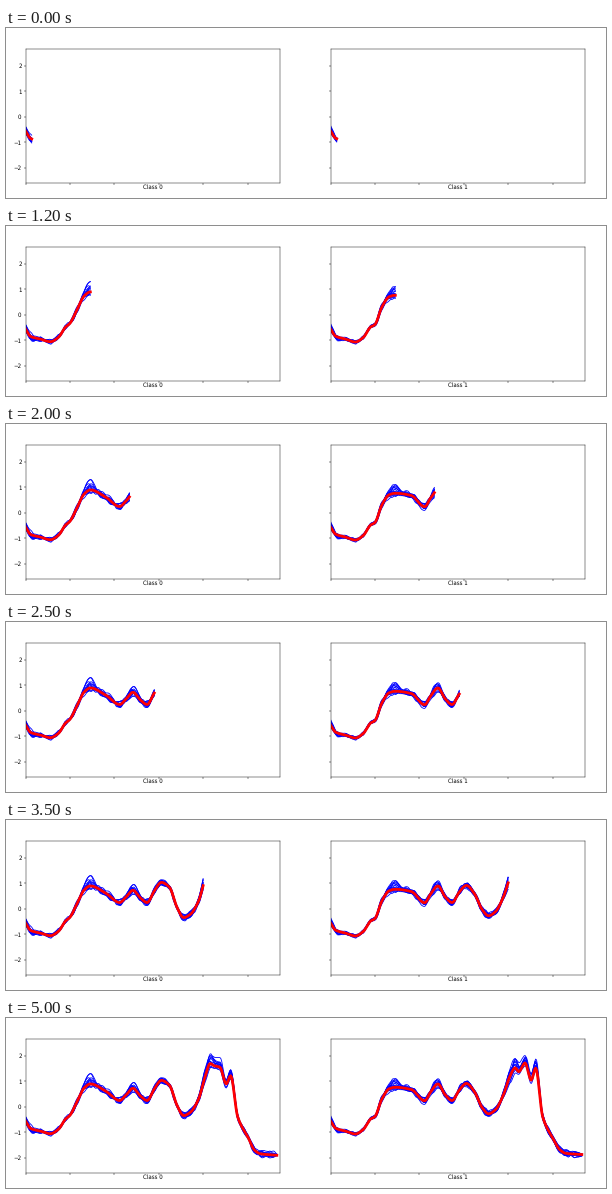
A matplotlib script that plays this animation: 600 by 170 pixels, repeating every 5.1 s.

```python
import numpy as np
import matplotlib.pyplot as plt
from matplotlib.animation import FuncAnimation

plt.rcParams["text.hinting"] = "none"

W, H, DPI = 600, 170, 40
FRAMES, INTERVAL = 51, 100
LENGTH, SERIES = 286, 14
T = np.arange(LENGTH)

# time, mean of class 0, mean of class 1
MEANS = [
    (0, -.55, -.55), (6, -.85, -.84), (17, -.95, -.95), (28, -1.05, -1.06),
    (37, -.88, -.88), (45, -.48, -.48), (50, -.33, -.38), (58, .2, .32),
    (66, .74, .71), (73, .9, .77), (91, .6, .68), (106, .25, .24),
    (113, .46, .6), (121, .73, .9), (129, .44, .48), (137, .25, .25),
    (145, .7, .66), (153, 1.04, .92), (162, .85, .6), (171, .03, -.04),
    (178, -.34, -.27), (186, -.2, -.1), (195, .32, .5), (202, 1.15, 1.2),
    (208, 1.7, 1.53), (212, 1.62, 1.38), (219, 1.55, 1.72), (226, .9, 1.05),
    (231, 1.22, 1.52), (239, -.4, -.4), (251, -1.22, -1.27),
    (258, -1.7, -1.67), (265, -1.84, -1.82), (285, -1.9, -1.87),
]

# centre, lowest and highest offset of the strongest spreads
SPREADS = [(0, -.06, .2), (8, -.14, .04), (72, -.15, .36), (121, -.12, .16),
           (202, -.22, .24), (209, -.16, .36), (220, -.1, .26),
           (231, -.1, .25)]


def smooth_curve(t, v):
    """Cubic curve that stays monotone between the knots."""
    h = np.diff(t)
    d = np.diff(v) / h
    slope = np.zeros(len(t))
    slope[0], slope[-1] = d[0], d[-1]
    rising = d[:-1] * d[1:] > 0
    slope[1:-1][rising] = (2 * d[:-1] * d[1:])[rising] / (d[:-1] + d[1:])[rising]
    i = np.clip(np.searchsorted(t, T, side="right") - 1, 0, len(h) - 1)
    h = h[i]
    s = (T - t[i]) / h
    return ((1 + 2 * s) * (1 - s) ** 2 * v[i] + s * (1 - s) ** 2 * h * slope[i]
            + s * s * (3 - 2 * s) * v[i + 1] + s * s * (s - 1) * h * slope[i + 1])


def make_series(mean, rng):
    kernel = np.hanning(7) / np.hanning(7).sum()
    noise = rng.normal(0, .045, (SERIES, LENGTH))
    rows = np.array([mean + np.convolve(row, kernel, "same") for row in noise])
    small = [(c, -.12, .12) if c > 50 else (c, -.05, .06)
             for c in range(16, LENGTH, 10)]
    for centre, low, high in SPREADS + small:
        scale = rng.permutation(np.linspace(low, high, SERIES))
        rows += np.outer(scale, np.exp(-((T - centre) / 4) ** 2 / 2))
    return rows


rng = np.random.default_rng(4)
times, *means = np.array(MEANS).T
fig = plt.figure(figsize=(W / DPI, H / DPI), dpi=DPI)
lines = []
for k, left in enumerate((19.5, 324.5)):
    ax = fig.add_axes([left / W, 15.5 / H, 254 / W, 134 / H])
    ax.set(xlim=(0, LENGTH), ylim=(-2.57, 2.68),
           xticks=range(0, LENGTH, 50), yticks=range(-2, 3))
    ax.set_xticklabels([])
    if k:
        ax.set_yticklabels([])
    ax.set_xlabel(f"Class {k}")
    ax.xaxis.set_label_coords(.5, -2.2 / 134)

    mean = smooth_curve(times, means[k])
    for row in make_series(mean, rng):
        lines.append((ax.plot([], [], color="blue", lw=1.5)[0], row))
    lines.append((ax.plot([], [], color="red", lw=5)[0], mean))


def draw(frame):
    n = round(7.5 + 5.52 * frame)
    for line, values in lines:
        line.set_data(T[:n], values[:n])
    return [line for line, _ in lines]


anim = FuncAnimation(fig, draw, frames=FRAMES, interval=INTERVAL,
                     repeat=True, repeat_delay=0)
plt.show()
```
